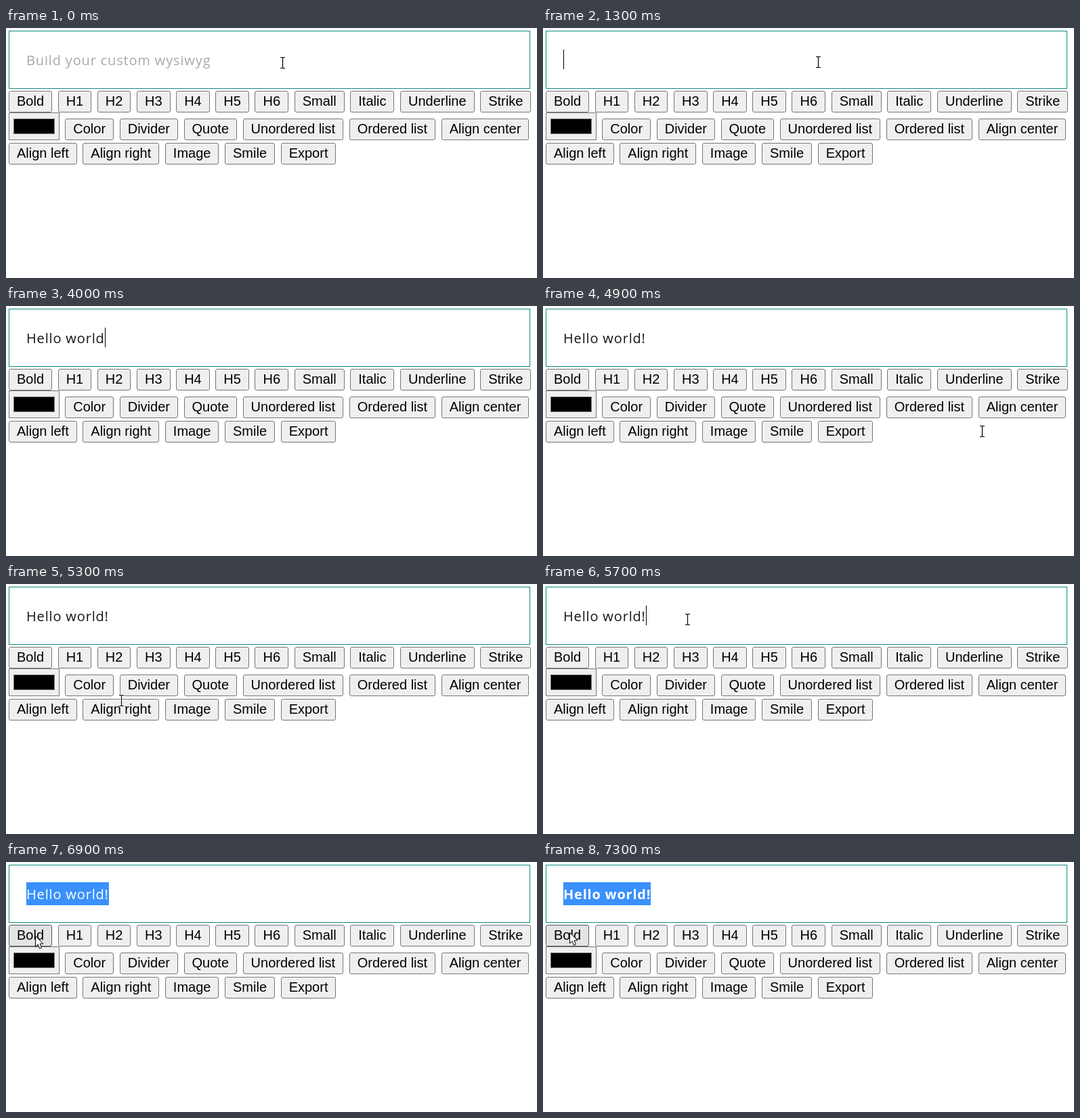
Animation, 784 px wide and 370 px high, one loop 8000 ms. Source, as an HTML page:

```html
<!DOCTYPE html>
<html lang="en">
<head>
<meta charset="utf-8">
<title>Editor demo</title>
<style>
  html, body { margin: 0; width: 100%; height: 100%; overflow: hidden; background: #fff; }
  #stage { position: relative; width: 784px; height: 370px; overflow: hidden; }
  #stage > * { position: absolute; box-sizing: border-box; white-space: pre; }
  #editor { left: 4px; top: 4px; width: 770px; height: 86px; border: 1px solid #0d8c7f; }
  #text, #hint {
    left: 30px; top: 30px; height: 34px;
    font: 20px/36px "Open Sans", "Noto Sans", sans-serif;
    letter-spacing: .83px; color: #161616;
  }
  #hint { color: #a9a9a9; }
  #text.bold { font-weight: 700; letter-spacing: .77px; }
  #mark { display: inline-block; height: 34px; vertical-align: top; background: #3a91fa; color: #fff; }
  #caret { top: 32px; width: 1px; height: 29px; background: #000; }
  .row { left: 4px; display: flex; gap: 8.6px; }
  .row span {
    box-sizing: border-box; height: 32px; padding: 0 11px;
    border: 1px solid #767676; border-radius: 3px; background: #efefef;
    font: 20px/28px "Liberation Sans", Arial, sans-serif; color: #000;
  }
  .row .hover { background: #e3e5e5; border-color: #555; }
  #swatch {
    left: 4px; top: 125px; width: 75px; height: 41px; padding: 8px 6px;
    border: 1px solid #767676; background: #efefef;
  }
  #swatch i { display: block; box-sizing: border-box; height: 23px; background: #000; border: 1px solid #777; }
  .cursor { left: 0; top: 0; overflow: visible; }
</style>
</head>
<body>
<div id="stage">
  <div id="editor"></div>
  <div id="hint">Build your custom wysiwyg</div>
  <div id="text"><span id="plain"></span><span id="mark"></span></div>
  <div id="caret"></div>
  <div id="swatch"><i></i></div>
  <div class="row" style="top:93px">Bold,H1,H2,H3,H4,H5,H6,Small,Italic,Underline,Strike</div>
  <div class="row" style="top:134px;left:87.3px">Color,Divider,Quote,Unordered list,Ordered list,Align center</div>
  <div class="row" style="top:170px">Align left,Align right,Image,Smile,Export</div>
  <svg class="cursor" id="beam" width="1" height="1" fill="none">
    <path id="bar" d="M-3.5-8H-1L0-7L1-8H3.5M0-7V7M-3.5 8H-1L0 7L1 8H3.5" stroke="#fff" stroke-width="3"/>
    <path d="M-3.5-8H-1L0-7L1-8H3.5M0-7V7M-3.5 8H-1L0 7L1 8H3.5" stroke="#000" stroke-width="1.2"/>
  </svg>
  <svg class="cursor" id="arrow" width="1" height="1">
    <path d="M0 0V16L3.7 12.6L6.2 18.6L9 17.4L6.5 11.5H11.4Z" fill="#fff" stroke="#000"/>
  </svg>
</div>
<script>
const LOOP = 8000, STEP = 100;
const FOCUS = 300, DRAG = 5800, DRAG_END = 6200, LEAVE = 6600, CLICK = 7200;
const $ = id => document.getElementById(id);
const text = $('text');

for (const row of document.querySelectorAll('.row')) {
  const labels = row.textContent.split(',');
  row.replaceChildren(...labels.map(label => {
    const b = document.createElement('span');
    b.textContent = label;
    return b;
  }));
}
const boldBtn = document.querySelector('.row span');

// Typing bursts: start, time per letter, letters
const bursts = [[2300, 180, 'Hello '], [3400, 150, 'world'], [4400, 0, '!']];
const keys = bursts.flatMap(([start, gap, word]) =>
  [...word].map((letter, i) => ({ letter, time: start + i * gap })));

// Pointer visits: time, x, y
const visits = [
  [[0, 408, 51], [FOCUS, 406, 50], [1300, 406, 50], [1800, 618, 183]],
  [[4400, 690, 176], [4500, 703, 186], [4800, 703, 186], [5300, 170, 172], [5700, 213, 52],
    [DRAG_END, 9, 53], [6700, 46, 114], [7100, 39, 104], [LOOP, 39, 104]]
];

function pointerAt(t) {
  const path = visits.find(p => t >= p[0][0] && t < p[p.length - 1][0]);
  if (!path) return null;
  const i = path.findIndex(p => p[0] > t);
  const [t0, x0, y0] = path[i - 1], [t1, x1, y1] = path[i];
  const u = (t - t0) / (t1 - t0), k = u * u * (3 - 2 * u);
  return [Math.round(x0 + (x1 - x0) * k), Math.round(y0 + (y1 - y0) * k)];
}

function show(el, on) {
  el.style.display = on ? '' : 'none';
}

function place(el, pos) {
  show(el, pos);
  if (pos) el.style.transform = `translate(${pos[0] + .5}px,${pos[1] + .5}px)`;
}

// The drag selects from the end of the line towards its start
function selectionStart(t, pos, length) {
  if (t < DRAG) return length;
  if (t >= DRAG_END) return 0;
  const part = (pos[0] - 30) / 122;
  return Math.round(length * Math.min(1, Math.max(0, part)));
}

function draw(t) {
  const pressed = keys.filter(k => k.time <= t);
  const typed = pressed.map(k => k.letter).join('');
  const pos = pointerAt(t), onToolbar = t >= LEAVE;
  const from = selectionStart(t, pos, typed.length);

  show($('hint'), t < FOCUS);
  text.className = t >= CLICK ? 'bold' : '';
  $('plain').textContent = typed.slice(0, from);
  $('mark').textContent = typed.slice(from);

  // The caret restarts its blink at every key
  const lastInput = pressed.length ? pressed[pressed.length - 1].time : FOCUS;
  const lit = Math.floor((t - lastInput) / 500) % 2 === 0;
  show($('caret'), t >= FOCUS && t < DRAG && lit);
  $('caret').style.left = 30 + Math.round(text.getBoundingClientRect().width) + 'px';

  boldBtn.className = onToolbar ? 'hover' : '';
  place($('beam'), onToolbar ? null : pos);
  place($('arrow'), onToolbar ? pos : null);
}

function frame(now) {
  draw(Math.floor((now % LOOP) / STEP) * STEP);
  requestAnimationFrame(frame);
}
draw(0);
requestAnimationFrame(frame);
</script>
</body>
</html>
```
